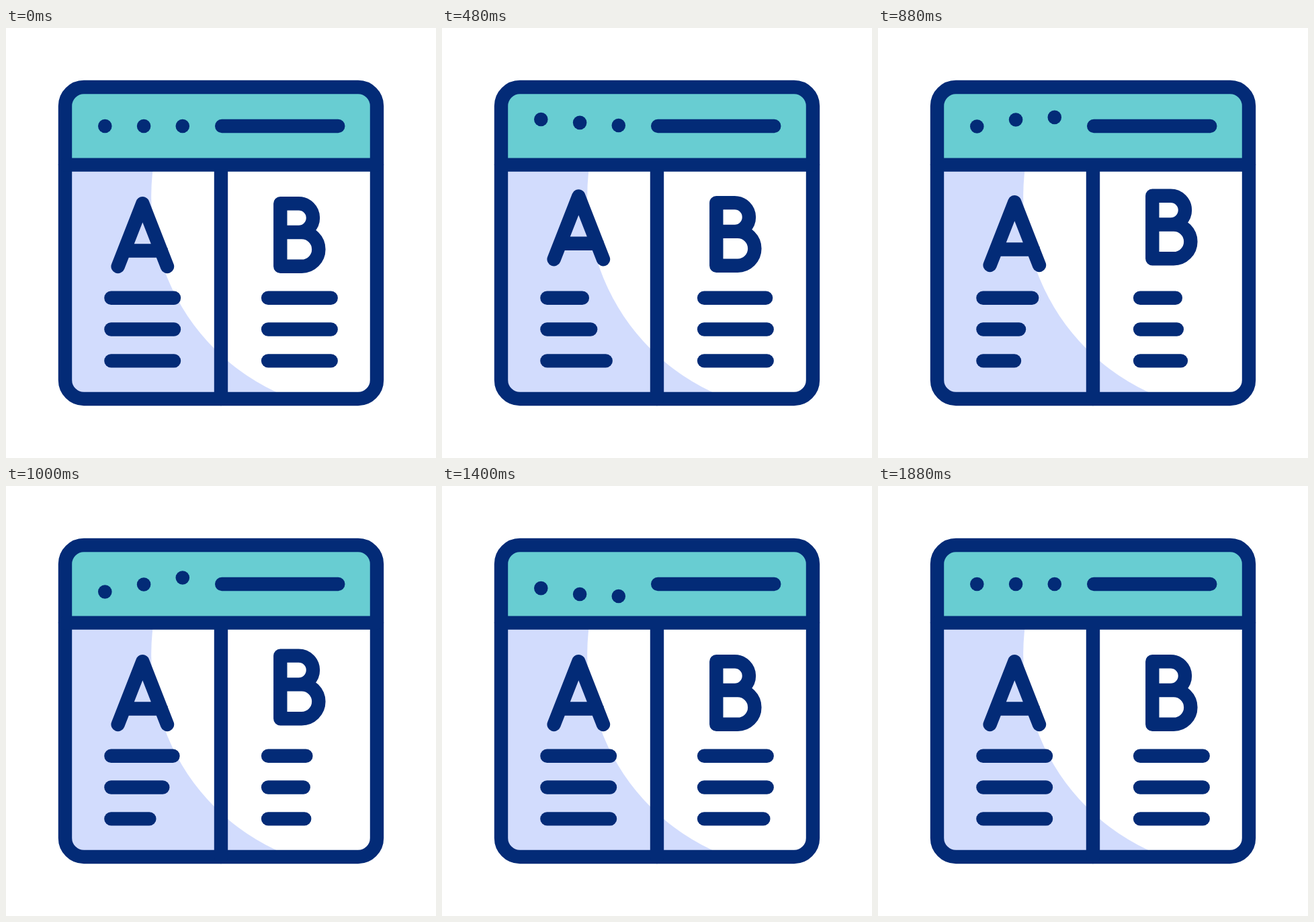
Animation, 640 px wide and 640 px high, one loop 1.92 s. Source, as an HTML page:

```html
<!DOCTYPE html>
<html lang="en">
<head>
<meta charset="utf-8">
<title>A/B comparison</title>
<style>
  html, body { margin: 0; width: 100%; height: 100%; overflow: hidden; background: #fff; }
  svg { display: block; width: 100vw; height: 100vh; }
  .ink { fill: none; stroke: #032b77; stroke-width: 20.4; stroke-linecap: round; stroke-linejoin: round; }
  .dot { fill: #032b77; }
</style>
</head>
<body>
<svg viewBox="0 0 640 640">
  <defs>
    <clipPath id="window"><rect x="88" y="88" width="464" height="464" rx="28"/></clipPath>
  </defs>
  <g clip-path="url(#window)">
    <rect x="88" y="88" width="464" height="464" fill="#d2dcfd"/>
    <circle cx="538.2" cy="250" r="322"/>
    <rect x="88" y="88" width="464" height="115" fill="#68cdd2"/>
  </g>
  <g class="ink">
    <rect x="88" y="88" width="464" height="464" rx="28"/>
    <path d="M88 203.6H552M320 203.6V552M321.2 146H494.3"/>
    <path id="letterA" d="M166.6 355L203.3 261.2L240 355M176 331.5H231"/>
    <path id="letterB" d="M435.6 304H408.3V261.2H435.6a21.4 21.4 0 0 1 0 42.8H440a25.4 25.4 0 0 1 0 50.8H408.3V304"/>
  </g>
  <g id="lines" class="ink"></g>
  <g id="dots" class="dot"></g>
</svg>
<script>
const LOOP = 1920, STEP = 40, COLUMN_DELAY = 240;
const byId = id => document.getElementById(id);
byId('window').parentNode.parentNode.querySelector('circle').setAttribute('fill', '#fff');

function add(parent, tag, attrs) {
  const node = document.createElementNS('http://www.w3.org/2000/svg', tag);
  for (const name in attrs) node.setAttribute(name, attrs[name]);
  return parent.appendChild(node);
}

// Bezier easing with flat ends; x1 and x2 set the softness at each end.
function ease(u, x1 = 1 / 3, x2 = 2 / 3) {
  if (u <= 0) return 0;
  if (u >= 1) return 1;
  let low = 0, high = 1, s;
  for (let i = 0; i < 24; i++) {
    s = (low + high) / 2;
    const r = 1 - s;
    const x = 3 * r * r * s * x1 + 3 * r * s * s * x2 + s * s * s;
    if (x < u) low = s; else high = s;
  }
  return s * s * (3 - 2 * s);
}

const ramp = (t, from, to, x1, x2) => ease((t - from) / (to - from), x1, x2);

const dotShift = t =>
  -13.1 * ramp(t, 160, 627) + 31.1 * ramp(t, 655, 1145) - 18 * ramp(t, 1160, 1640, 0.42, 0.36);
const letterShift = t => -11.5 * (ramp(t, 160, 620, 0.4, 0.2) - ramp(t, 662, 960));
const lineShrink = t => ramp(t, 180, 680, 0.4, 0.2) - ramp(t, 697, 1037);

const dots = [147.3, 205.1, 262.8].map((cx, i) => ({
  node: add(byId('dots'), 'circle', { cx, cy: 146, r: 10.3 }),
  delay: i * 120
}));

const columns = [
  { left: 156.4, reach: 47, delay: 0 },
  { left: 390.1, reach: 41, delay: COLUMN_DELAY }
];
const lines = columns.flatMap(({ left, reach, delay }) =>
  [401.8, 448.5, 495.4].map((y, row) => ({
    node: add(byId('lines'), 'line', { x1: left, y1: y, y2: y }),
    right: left + 93.6,
    reach,
    delay: delay + row * 100
  })));

const letters = [
  { node: byId('letterA'), delay: 0 },
  { node: byId('letterB'), delay: COLUMN_DELAY }
];

function draw(t) {
  for (const { node, delay } of dots) node.setAttribute('cy', 146 + dotShift(t - delay));
  for (const { node, delay } of letters)
    node.setAttribute('transform', `translate(0 ${letterShift(t - delay)})`);
  for (const { node, right, reach, delay } of lines)
    node.setAttribute('x2', right - reach * lineShrink(t - delay));
}

const start = performance.now();
function tick() {
  const elapsed = (performance.now() - start) % LOOP;
  draw(Math.floor(elapsed / STEP) * STEP);
  requestAnimationFrame(tick);
}
tick();
</script>
</body>
</html>
```
